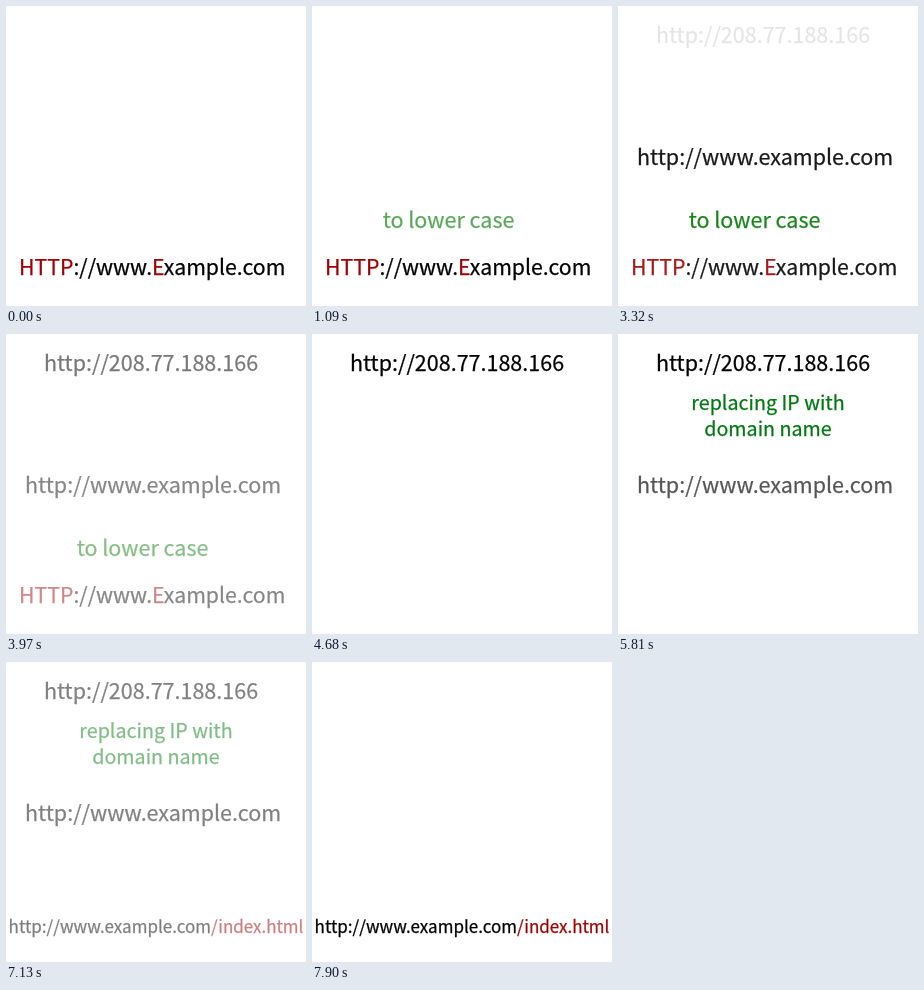
Animation of 300 by 300 pixels, one loop 8 s. Source, as an HTML page:

```html
<!DOCTYPE html>
<html lang="en">
<head>
<meta charset="utf-8">
<title>URL normalization</title>
<style>
  html, body { margin: 0; width: 100%; height: 100%; overflow: hidden; background: #fff; }
  svg { display: block; width: 100%; height: 100%; }
  text {
    font-family: "Noto Sans CJK SC", "Noto Sans CJK JP", "Noto Sans CJK", "Open Sans", sans-serif;
    font-size: 21.5px;
    text-anchor: middle;
  }
  /* a hairline outline gives the slightly heavier letter weight */
  text, tspan { color: #000; fill: currentColor; stroke: currentColor; stroke-width: .25px; }
  #mixed { font-size: 21.25px; }
  #lower { color: #007800; }
  #replace text { font-size: 19.7px; color: #007810; }
  #index { font-size: 17px; }
  tspan { color: #a00000; }
</style>
</head>
<body>
<svg viewBox="0 0 300 300">
  <text id="mixed" x="146.2" y="269"><tspan>HTTP</tspan>://www.<tspan>E</tspan>xample.com</text>
  <text id="lower" x="136.5" y="221.5">to lower case</text>
  <text id="domain" x="147.1" y="159">http://www.example.com</text>
  <text id="ip" x="145" y="37">http://208.77.188.166</text>
  <g id="replace">
    <text x="150" y="76">replacing IP with</text>
    <text x="150" y="102">domain name</text>
  </g>
  <text id="index" x="150" y="271">http://www.example.com<tspan>/index.html</tspan></text>
</svg>
<script>
  const LOOP = 8000;
  const parts = Object.fromEntries(
    ["mixed", "lower", "domain", "ip", "replace", "index"].map(id => [id, document.getElementById(id)])
  );

  const ramp = (t, from, to) => Math.min(1, Math.max(0, (t - from) / (to - from)));

  function draw(t) {
    const noteIn = ramp(t, 100, 1640);
    const domainIn = ramp(t, 1640, 3170);
    const toIp = ramp(t, 3170, 4680);
    const domainBack = ramp(t, 4780, 6340);
    const toIndex = ramp(t, 6340, 7900);

    const opacity = {
      mixed: 1 - toIp,
      lower: noteIn * (1 - toIp),
      domain: t < 4780 ? domainIn * (1 - toIp) : domainBack * (1 - toIndex),
      ip: toIp * (1 - toIndex),
      replace: t < 4780 ? 0 : 1 - toIndex,
      index: toIndex
    };
    for (const id in parts) parts[id].style.opacity = opacity[id];
  }

  const start = performance.now();
  function tick() {
    draw((performance.now() - start) % LOOP);
    requestAnimationFrame(tick);
  }
  tick();
</script>
</body>
</html>
```
